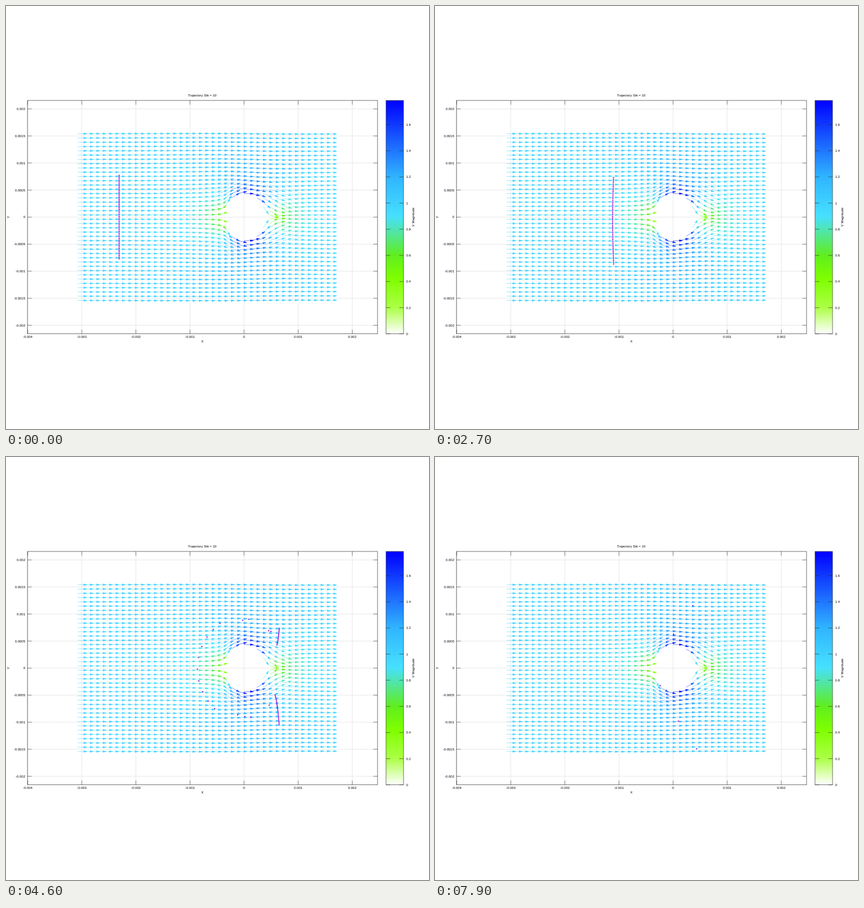
Write an HTML page that moves like this. It is 748 px wide and 748 px high and loops after 8 s.

```html
<!DOCTYPE html>
<html lang="en">
<head>
<meta charset="utf-8">
<title>Trajectory</title>
<style>
html, body { margin: 0; width: 100%; height: 100%; overflow: hidden; background: #fff; }
svg { display: block; width: 100vw; height: 100vh; }
text { font: 6px "Liberation Sans", Arial, sans-serif; fill: #000; }
</style>
</head>
<body>
<svg id="stage" viewBox="0 0 748 748">
  <defs><linearGradient id="bar" x1="0" y1="1" x2="0" y2="0"></linearGradient></defs>
</svg>
<script>
const stage = document.getElementById('stage');
const CX = 421, CY = 373.3, UNIT = 95.65;   // origin and pixels per 0.001
const R = 0.385 * UNIT;                     // cylinder radius
const BOX = { l: 38, r: 657, t: 167, b: 579.7 };
const BAR = { l: 672, r: 703 };
const VMAX = 1.785;

const PALETTE = [
  [0, 255, 255, 255],
  [0.2, 172, 255, 70],
  [0.42, 127, 255, 0],
  [0.6, 96, 238, 30],
  [0.9, 70, 224, 255],
  [1.2, 48, 180, 255],
  [VMAX, 0, 0, 255]
];

function add(tag, attrs, parent = stage) {
  const el = document.createElementNS('http://www.w3.org/2000/svg', tag);
  for (const key in attrs) el.setAttribute(key, attrs[key]);
  parent.appendChild(el);
  return el;
}

function label(text, x, y, anchor = 'middle', turned = false) {
  const attrs = { x, y, 'text-anchor': anchor };
  if (turned) attrs.transform = `rotate(-90 ${x} ${y})`;
  add('text', attrs).textContent = text;
}

function colour(v) {
  const i = Math.max(1, PALETTE.findIndex(p => p[0] >= v));
  const b = v >= VMAX ? PALETTE[PALETTE.length - 1] : PALETTE[i];
  const a = v >= VMAX ? b : PALETTE[i - 1];
  const k = b === a ? 0 : (v - a[0]) / (b[0] - a[0]);
  return `rgb(${[1, 2, 3].map(c => Math.round(a[c] + (b[c] - a[c]) * k))})`;
}

// Potential flow round a cylinder, free stream 1, in screen axes.
function flow(x, y) {
  const r2 = x * x + y * y, k = R * R / (r2 * r2);
  return [1 - k * (x * x - y * y), -2 * k * x * y];
}

function drawGrid() {
  let grid = '', ticks = '';
  for (let i = 0; i < 7; i++) {
    const x = CX + (i - 4) * UNIT;
    grid += `M${x} ${BOX.t}V${BOX.b}`;
    ticks += `M${x} ${BOX.t}v7.5M${x} ${BOX.b}v-7.5`;
    label(String((i - 4) / 1000), x, 587.2);
  }
  for (let i = 0; i < 9; i++) {
    const y = CY + (i - 4) * UNIT / 2;
    grid += `M${BOX.l} ${y}H${BOX.r}`;
    ticks += `M${BOX.l} ${y}h7.5M${BOX.r} ${y}h-7.5`;
    label(String((4 - i) / 2000), 34, y + 2.1, 'end');
  }
  add('path', { d: grid, stroke: '#bbb', 'stroke-width': 0.6, 'stroke-dasharray': '1 0.8', fill: 'none' });
  add('path', { d: ticks, stroke: '#333', 'stroke-width': 0.6, fill: 'none' });
  add('rect', {
    x: BOX.l, y: BOX.t, width: BOX.r - BOX.l, height: BOX.b - BOX.t,
    fill: 'none', stroke: '#333', 'stroke-width': 0.7
  });
  label('Trajectory Stk = 10', 347, 160.2);
  label('X', 347.3, 595);
  label('Y', 6.5, 373.3, 'middle', true);
}

function drawBar() {
  const ramp = document.getElementById('bar');
  PALETTE.forEach(p => add('stop', { offset: p[0] / VMAX, 'stop-color': colour(p[0]) }, ramp));
  add('rect', {
    x: BAR.l, y: BOX.t, width: BAR.r - BAR.l, height: BOX.b - BOX.t,
    fill: 'url(#bar)', stroke: '#333', 'stroke-width': 0.7
  });
  let ticks = '';
  for (let i = 0; i < 9; i++) {
    const y = BOX.b - i * 0.2 / VMAX * (BOX.b - BOX.t);
    ticks += `M${BAR.l} ${y}h7.5M${BAR.r} ${y}h-7.5`;
    label(String(i / 5), 707.5, y + 2.1, 'start');
  }
  add('path', { d: ticks, stroke: '#222', 'stroke-width': 0.6 });
  label('V Magnitude', 722, 373.3, 'middle', true);
}

function drawArrows() {
  const N = 40, LEN = 16.5, HEAD = 5.4, HALF = 1.55;
  const group = add('g', { 'stroke-width': 0.5 });
  for (let c = 0; c < N; c++) {
    for (let r = 0; r < N; r++) {
      const x = R * (-8 + 12 * c / (N - 1));
      const y = R * (-4 + 8 * r / (N - 1));
      if (Math.hypot(x, y) < R) continue;
      const [u, w] = flow(x, y), v = Math.hypot(u, w);
      const turn = Math.atan2(w, u) * 180 / Math.PI;
      const paint = colour(v);
      add('path', {
        d: `M0 0H${LEN}l${-HEAD} ${-HALF}v${2 * HALF}L${LEN} 0`,
        transform: `translate(${(CX + x).toFixed(2)} ${(CY + y).toFixed(2)}) rotate(${turn.toFixed(2)})`,
        fill: paint, stroke: paint
      }, group);
    }
  }
}

// Heavy particles released from rest: drag, gravity, elastic bounce off the cylinder.
function simulate(steps) {
  const COUNT = 50, SPEED = 12.3, TAU = 10 * R / SPEED, G = 0.0228;
  let dots = Array.from({ length: COUNT }, (_, i) => ({
    x: -6 * R, y: R * (-2 + 4 * i / (COUNT - 1)), vx: 0, vy: 0
  }));
  const path = () => dots.map(p => `M${(CX + p.x).toFixed(2)} ${(CY + p.y).toFixed(2)}h0`).join('');
  const out = [path()];
  while (out.length < steps) {
    dots = dots.filter(p => p.x < 4 * R && Math.abs(p.y) < 4 * R);
    for (const p of dots) {
      const [u, w] = flow(p.x, p.y);
      p.vx += (SPEED * u - p.vx) / TAU;
      p.vy += (SPEED * w - p.vy) / TAU + G;
      p.x += p.vx;
      p.y += p.vy;
      const r = Math.hypot(p.x, p.y), nx = p.x / r, ny = p.y / r;
      const vn = p.vx * nx + p.vy * ny;
      if (r < R && vn < 0) {
        p.vx -= 2 * vn * nx;
        p.vy -= 2 * vn * ny;
      }
    }
    out.push(path());
  }
  return out;
}

drawGrid();
drawBar();
drawArrows();

const STEP = 100, LOOP = 8000;
const poses = simulate(LOOP / STEP);
const cloud = add('path', {
  d: poses[0], fill: 'none', stroke: '#9400d3', 'stroke-width': 2.3, 'stroke-linecap': 'round'
});

const start = performance.now();
let shown = 0;
function tick() {
  const pose = Math.floor((performance.now() - start) % LOOP / STEP);
  if (pose !== shown) cloud.setAttribute('d', poses[shown = pose]);
  requestAnimationFrame(tick);
}
tick();
</script>
</body>
</html>
```
